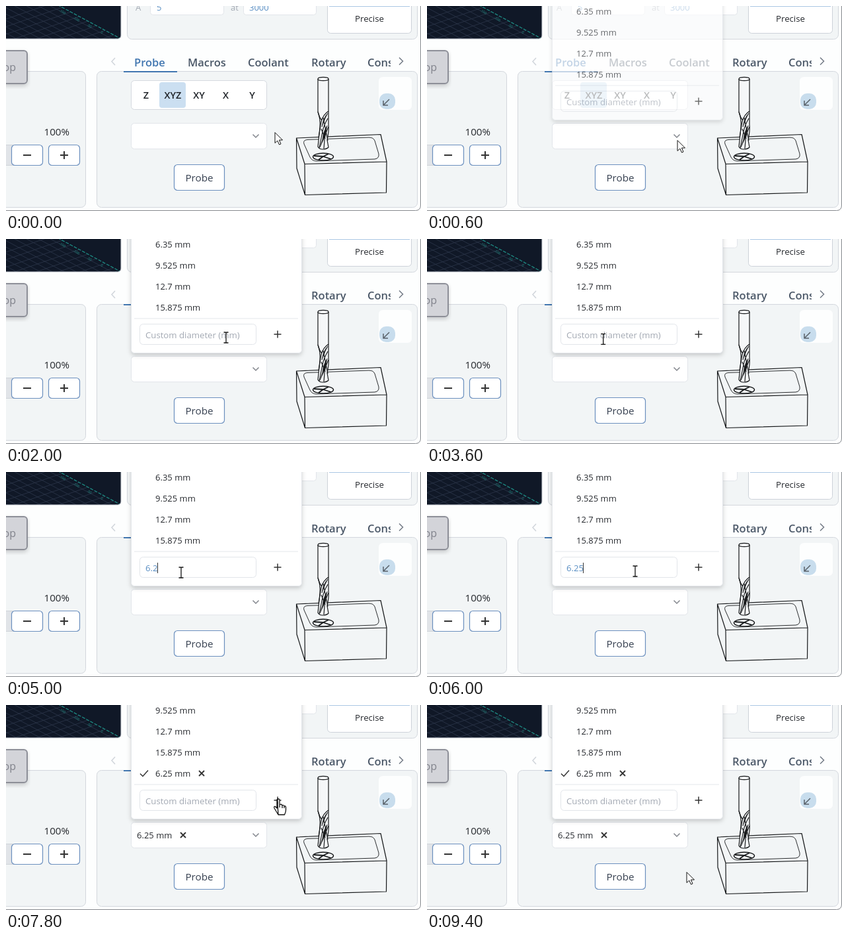
Animation, 628 px wide and 312 px high, one loop 9800 ms. Source, as an HTML page:

```html
<!DOCTYPE html>
<html lang="en">
<head>
<meta charset="utf-8">
<title>Probe diameter picker</title>
<style>
  html, body { margin: 0; width: 100%; height: 100%; overflow: hidden; background: #fdfefe; }
  svg { display: block; }
  text { font: 13px "Open Sans", "Noto Sans", sans-serif; fill: #26292e; white-space: pre; }
  .tab { font-size: 16.5px; font-weight: 600; fill: #4b5868; }
  .axis { font-size: 14.5px; font-weight: 600; fill: #1f2328; }
  .mid { text-anchor: middle; }
  .faint { fill: #a3a9b3; }
  .blue { fill: #5a8fc4; }
  .panel { fill: #f2f5f6; stroke: #d3d7dd; }
  .field { fill: #fff; stroke: #e2e5ea; }
  .button { fill: #fff; stroke: #6b8fbe; stroke-width: 1.2; }
  .line { fill: none; stroke: #333; stroke-width: 1.5; }
  .ink { fill: none; stroke: #16181a; stroke-width: 1.2; stroke-linejoin: round; }
  .cursor { fill: #fff; stroke: #111; stroke-linejoin: round; }
</style>
</head>
<body>
<svg width="628" height="312" viewBox="0 0 628 312">
  <defs>
    <clipPath id="view"><rect x="-10" y="-10" width="184" height="60" rx="5"/></clipPath>
    <filter id="shadow" x="-10%" y="-10%" width="120%" height="125%">
      <feDropShadow dx="0" dy="3" stdDeviation="3" flood-opacity=".18"/>
    </filter>
  </defs>

  <!-- window edge and 3D view -->
  <path d="M627.5 0V303q0 8-8 8.500H0" fill="none" stroke="#85888d"/>
  <g clip-path="url(#view)">
    <rect width="174" height="50" fill="#101827"/>
    <path id="grid" fill="none" stroke="#2c374b" stroke-width=".8"/>
    <path d="M72-5L174 50" stroke="#1d8f86" stroke-width="1.2" stroke-dasharray="5 2"/>
    <g id="ticks"></g>
  </g>
  <rect x="-10" y="-10" width="184" height="60" rx="5" fill="none" stroke="#c3c7ce"/>

  <!-- top settings -->
  <rect class="panel" x="183.500" y="-10" width="439" height="60.500" rx="7"/>
  <rect class="field" x="218.500" y="-20" width="111" height="33.500" rx="4"/>
  <rect class="field" x="359.500" y="-20" width="110" height="33.500" rx="4"/>
  <text class="faint" x="196" y="7">A</text>
  <text class="blue" x="228" y="7">5</text>
  <text class="faint" x="340" y="7">at</text>
  <text class="blue" x="368" y="7">3000</text>
  <rect x="486.500" y="-10" width="127" height="51.500" rx="5" fill="#fff" stroke="#cdd2d9"/>
  <path d="M489 .3H611" stroke="#a9c6e4" stroke-width="1.6"/>
  <text class="mid" x="550" y="24" style="font-size:13.200px">Precise</text>

  <!-- left panel -->
  <rect class="panel" x="-10" y="99.500" width="130.500" height="207" rx="7"/>
  <rect x="-10" y="68" width="42" height="50" rx="5" fill="#d3d4d9" stroke="#8d8f98" stroke-width="2" filter="url(#shadow)"/>
  <text x="15" y="99" text-anchor="end" style="font-size:16px;fill:#80828b">Stop</text>
  <text x="57.500" y="197" style="font-size:15.200px">100%</text>
  <rect x="-10" y="211.500" width="22" height="31" fill="#e1e4e8" stroke="#cfd3d9"/>
  <rect class="button" x="8.500" y="211.500" width="47" height="31" rx="5"/>
  <rect class="button" x="64.500" y="211.500" width="47" height="31" rx="5"/>
  <path class="line" d="M26 227H38M82 227H94M88 221V233" style="stroke-width:2"/>

  <!-- tabs -->
  <rect class="panel" x="137.500" y="99.500" width="485" height="207" rx="7"/>
  <path d="M178 100H259" stroke="#4176b0" stroke-width="2"/>
  <path class="line" d="M165 79l-5 5.500 5 5.500" style="stroke:#d0d5db"/>
  <path class="line" d="M595 78.500l5.500 5.500-5.500 5.500" style="stroke:#737b86"/>
  <text class="tab" x="194" y="92" style="fill:#4176b0">Probe</text>
  <text class="tab" x="275" y="92">Macros</text>
  <text class="tab" x="366" y="92">Coolant</text>
  <text class="tab" x="462" y="92">Rotary</text>
  <svg x="547" width="35" height="110"><text class="tab" y="92">Console</text></svg>

  <!-- probe controls -->
  <rect class="field" x="189.500" y="113.500" width="205" height="44" rx="5" style="stroke:#d5d9df"/>
  <rect x="232" y="116" width="40" height="39" rx="4" fill="#cbdff1"/>
  <g class="mid">
    <text class="axis" x="212" y="141">Z</text>
    <text class="axis" x="252.500" y="141">XYZ</text>
    <text class="axis" x="292" y="141">XY</text>
    <text class="axis" x="332.500" y="141">X</text>
    <text class="axis" x="372.500" y="141">Y</text>
  </g>
  <rect class="field" x="189.500" y="178.500" width="205" height="39" rx="5"/>
  <path class="line" d="M373.500 195.500l4.500 4.500 4.500-4.500" style="stroke:#82868d"/>
  <text id="value" x="198" y="203"></text>
  <path id="clear" class="line" d="M264 194l8 8m0-8l-8 8" style="stroke-width:1.800"/>
  <rect class="button" x="254.500" y="241.500" width="76" height="39" rx="5"/>
  <text class="mid" x="292.500" y="267" style="font-size:15.200px;font-weight:500;fill:#374151">Probe</text>

  <!-- corner marker -->
  <rect x="564" y="108" width="50" height="50" rx="6" fill="#fdfefe"/>
  <rect x="565" y="133" width="24" height="24" rx="10" fill="#c8dded"/>
  <path class="line" d="M580 142l-9 9m0-7v7h7" style="stroke:#59616a"/>

  <!-- end mill and stock -->
  <g class="ink">
    <path d="M439.500 201L567 195.500 576 237 452 240.500ZM439.500 201L440 247 452.500 287.500 575.500 284 576 237M452 240.500L452.500 287.500"/>
    <path d="M456 203.500L549 200q7 0 9 5l6 20q1 7-6 8L470 236q-7 0-10-6l-9-20q-2-6 5-6.500Z" stroke-width=".9"/>
    <ellipse cx="480" cy="229.500" rx="15.500" ry="5.500" stroke-width="1.500"/>
    <path d="M466 228l14 1 8-4M480 229l12 4M480 229l-7 5" stroke-width="1.800"/>
    <path d="M472 111V161q4 10 3 24L472 214q2 4 7 4 6 0 9-3L486 204q3-14 2-24V111" fill="#f5f7f8"/>
    <ellipse cx="480" cy="111" rx="8" ry="2.700" fill="#f5f7f8"/>
    <path d="M488 160q-8 5-11 16l-4 24M472 161q2 9 6 13M487 171q-6 10-8 20l-5 25M488 184q-5 10-6 20l-1 13M480 170l4 20 3 15M477 187l6 15"/>
    <path d="M487 163q-7 7-9 21l5-13ZM486 182q-6 9-7 21l-4 12 7-15Z" fill="#16181a" stroke-width=".6"/>
  </g>

  <!-- diameter menu -->
  <g id="menu">
    <rect x="189.500" y="-20" width="258" height="193.500" rx="5" fill="#fff" stroke="#e3e6ea" filter="url(#shadow)"/>
    <g id="items"></g>
    <path id="check" class="line" d="M203 8.500l4 4 8-9"/>
    <path id="remove" class="line" d="M292 100l8 8m0-8l-8 8" style="stroke-width:1.800"/>
    <path d="M194 121H442" stroke="#e3e6ea"/>
    <rect class="field" x="202.500" y="129.500" width="176" height="31" rx="5"/>
    <text id="entry" x="211" y="151" style="font-size:13.200px"></text>
    <path id="caret" d="M0 138V154" stroke="#333"/>
    <path class="line" d="M405.500 145H416.500M411 139.500V150.500"/>
  </g>

  <g id="cursor">
    <path class="cursor" d="M0 0V16L3.800 12.500 6.500 18.500 9 17.400 6.400 11.500H11.500Z"/>
    <path class="line" d="M-3.500-8H-1Q0-8 0-7 0-8 1-8H3.500M0-7V7M-3.500 8H-1Q0 8 0 7 0 8 1 8H3.500" style="stroke:#111;stroke-width:1.300"/>
    <path class="cursor" style="stroke-width:1.300" d="M-2 1.500Q-2 0 0 0T2 1.500V9Q5 7 6 10 8 8.500 9 11 11.500 10 11.500 13V17Q11.500 20 9.500 24H0Q-2-4 0 0M-2 1.500V14L-4.500 11.500Q-7 11-6 14L0 24H9.500M2 9V13M6 10V14M9 11V14"/>
  </g>
</svg>

<script>
const LOOP = 9800, STEP = 200;
const ARROW = 0, BEAM = 1, HAND = 2;
const $ = id => document.getElementById(id);
const show = (el, on) => el.setAttribute("visibility", on ? "inherit" : "hidden");

// time, x, y, shape
const path = [
  [0, 407, 192.500, ARROW], [400, 380, 204, ARROW], [600, 379, 204.500, ARROW], [1000, 379, 204.500, ARROW],
  [1400, 368, 186, ARROW], [1600, 354, 160, BEAM], [2000, 333, 150, BEAM], [2200, 325, 150, BEAM],
  [3000, 268, 152, BEAM], [4400, 265, 153, BEAM], [5600, 265, 153, BEAM],
  [6200, 340, 150, BEAM], [6400, 385, 148, ARROW], [6600, 405, 147, HAND], [7000, 406, 147, HAND],
  [7800, 412, 143, HAND], [8000, 412, 143, HAND], [8400, 412, 147, HAND],
  [8600, 412, 147, HAND], [8800, 405, 184, ARROW], [9400, 393, 254.500, ARROW], [LOOP, 393, 254.500, ARROW]
];
const typing = [[4400, "6"], [4800, "6."], [5000, "6.2"], [5400, "6.25"]];

$("items").innerHTML = ["6.35", "9.525", "12.7", "15.875", "6.25"]
  .map((size, i) => `<text x="226" y="${13 + 32 * i}">${size} mm</text>`).join("");
const added = $("items").lastChild;

let grid = "";
for (let i = 0; i < 14; i++) {
  grid += `M${58 - i * 18}-5l104 56`;
  const x = 72 + i * 13, y = -5 + i * 7;
  grid += `M${x} ${y}l-150 52`;
}
$("grid").setAttribute("d", grid);
$("ticks").innerHTML = [-150, -100, -50, 0, 50].map((n, i) =>
  `<text transform="translate(${80 + i * 21} ${8 + i * 11}) rotate(28)" style="font-size:5px;fill:#25a092">${n}</text>`).join("");

function moveCursor(t) {
  const i = path.findIndex(key => key[0] > t) - 1;
  const [t0, x0, y0, shape] = path[i], [t1, x1, y1] = path[i + 1];
  const k = (t - t0) / (t1 - t0);
  $("cursor").setAttribute("transform", `translate(${x0 + (x1 - x0) * k} ${y0 + (y1 - y0) * k})`);
  [...$("cursor").children].forEach((el, n) => show(el, n === shape));
}

function draw(t) {
  const chosen = t >= 6800, custom = t >= 7200;
  $("menu").setAttribute("opacity", Math.min(1, Math.max(0, (t - 400) / 290)));

  $("items").setAttribute("transform", `translate(0 ${custom ? -32 : 0})`);
  show(added, custom);
  show($("remove"), custom);
  show($("clear"), custom);
  show($("check"), chosen);
  $("check").setAttribute("transform", `translate(0 ${custom ? 96 : 0})`);
  $("value").textContent = custom ? "6.25 mm" : chosen ? "6.35 mm" : "";

  const typed = custom ? "" : typing.reduce((text, [at, s]) => t >= at ? s : text, "");
  const entry = $("entry");
  entry.textContent = typed || "Custom diameter (mm)";
  entry.setAttribute("class", typed ? "blue" : "faint");

  const blinkOn = t >= 4400 || (t - 3000) % 1000 < 500;
  show($("caret"), t >= 3000 && t < 6600 && blinkOn);
  const end = typed ? entry.getComputedTextLength() : 0;
  $("caret").setAttribute("transform", `translate(${Math.round(211 + end) - .5} 0)`);

  moveCursor(t);
}

function tick() {
  const t = performance.now() % LOOP;
  draw(Math.floor(t / STEP) * STEP);
  requestAnimationFrame(tick);
}
tick();
</script>
</body>
</html>
```
